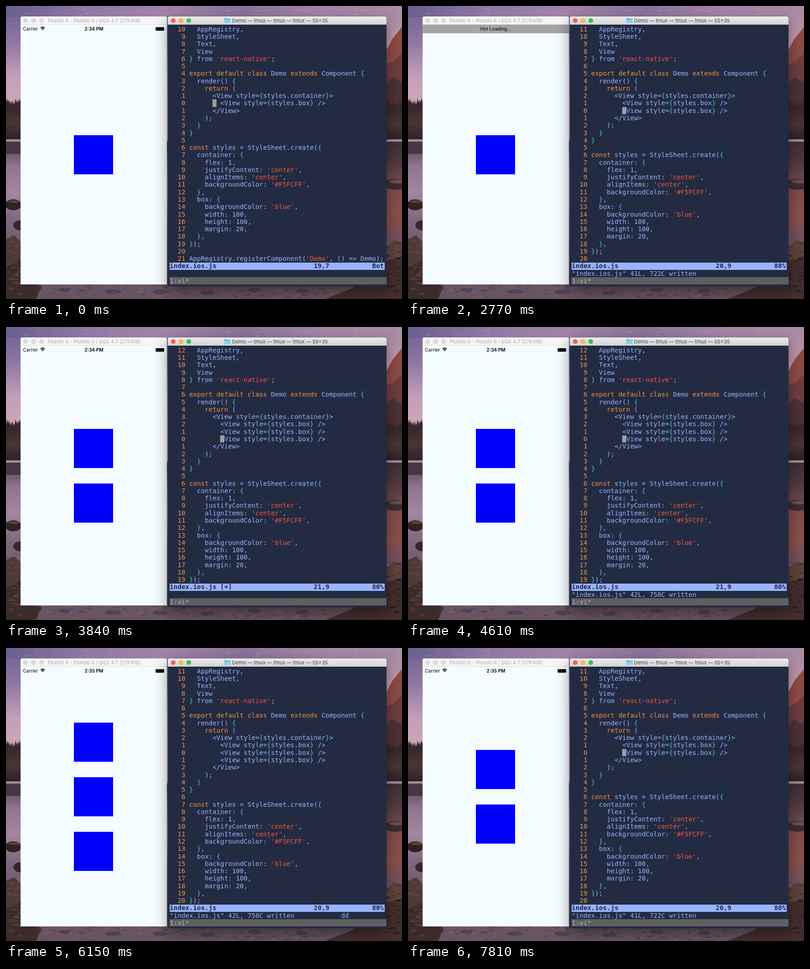
An HTML page with a canvas for the animation above (8 s loop, 869 by 644 pixels).

```html
<!DOCTYPE html>
<html lang="en">
<head>
<meta charset="utf-8">
<title>Hot loading demo</title>
<style>
  html, body { margin: 0; width: 100%; height: 100%; overflow: hidden; background: #5d4a58; }
  #stage { position: relative; width: 869px; height: 644px; overflow: hidden; }
  #stage div, #stage canvas, #stage svg { position: absolute; }
  .ui { font-family: Inter, Roboto, sans-serif; white-space: pre; line-height: 16px; text-align: center; }
  .dot { width: 10.4px; height: 10.4px; top: 3.7px; border-radius: 50%; box-sizing: border-box; box-shadow: inset 0 0 0 .6px rgba(0,0,0,.12); }

  #phone { left: 32px; top: 23px; width: 321px; height: 589px; background: #f5fcff; border-radius: 4px 4px 0 0; overflow: hidden; }
  #phone .bar { width: 321px; height: 18px; background: #f6f6f6; box-shadow: inset 0 -1px #dedede; }
  #phone .dot { background: #dcdcdc; }
  #phone .title { width: 321px; top: 1px; left: 1px; font-size: 11px; color: #acacac; }
  #screen { left: 0; top: 18px; width: 321px; height: 571px; overflow: hidden; }
  #carrier { left: 5px; top: 1px; font-size: 10.2px; }
  #clock { left: 0; width: 322px; top: 1px; font-size: 10.2px; font-weight: 600; }
  #wifi { left: 43px; top: 4px; }
  #battery { left: 296px; top: 5px; }
  #hot { left: 0; width: 321px; height: 19px; background: #a4a4a4; font-size: 10.3px; line-height: 18px; }
  .box { left: 117px; width: 86px; height: 86px; background: #00f; }

  #term { left: 355px; top: 23px; width: 480px; height: 593px; background: #232b43; border-radius: 4px;
    box-shadow: 0 11px 30px rgba(0,0,0,.42), 0 0 1px rgba(0,0,0,.5); }
  #term .bar { width: 480px; height: 18px; border-radius: 4px 4px 0 0; background: linear-gradient(#ebebeb, #d2d2d2); }
  #term .title { left: 141px; top: 1px; font-size: 11px; color: #444; }
  #folder { left: 124px; top: 3px; }
  #text { left: 0; top: 0; width: 869px; height: 644px; font: 14.2px "DejaVu Sans Mono", monospace; color: #96b3fa; }
  .row { white-space: pre; left: 359.3px; height: 16.27px; line-height: 16.27px; }
  #ruler { left: 359px; top: 564px; width: 472px; height: 16px; background: #98b4ff; }
  #tmux { left: 359px; top: 596px; width: 476px; height: 16px; background: #5f5f5f; }
  #cursor { width: 8.6px; height: 16.3px; background: #999; }
  .k { color: #ee943c; }
  .s { color: #ef5638; }
  .b { color: #3fc8c0; }
  .inv { color: #1f2740; font-weight: bold; }
  .dim { color: #b4b4b4; }
</style>
</head>
<body>
<div id="stage">
  <canvas id="scene" width="869" height="644"></canvas>

  <div id="phone">
    <div class="bar">
      <div class="dot" style="left:5.8px"></div><div class="dot" style="left:23.3px"></div><div class="dot" style="left:40.8px"></div>
      <div class="ui title">Plundo 6 - Plundo 6 / pQS 4.7 (27K418)</div>
    </div>
    <div id="screen">
      <div id="carrier" class="ui">Carrier</div>
      <svg id="wifi" width="11" height="9" viewBox="0 0 11 9" fill="none" stroke="#000" stroke-width="1.5">
        <path d="M.6 3.2Q5.5-1 10.4 3.2M2.4 5.2Q5.5 2.6 8.6 5.2"/><path d="M3.7 6.5Q5.5 5 7.3 6.5L5.5 8.6z" fill="#000" stroke="none"/>
      </svg>
      <div id="clock" class="ui"></div>
      <svg id="battery" width="22" height="9">
        <rect x=".4" y=".4" width="18.4" height="7.8" rx="1.2"/><path d="M19.6 2.8q1.5 1.4 0 2.9z"/>
      </svg>
      <div id="boxes"></div>
      <div id="hot" class="ui">Hot Loading...</div>
    </div>
  </div>

  <div id="term">
    <div class="bar">
      <div class="dot" style="left:6.8px;background:#fc5b57"></div><div class="dot" style="left:23.8px;background:#fdbb3f"></div><div class="dot" style="left:40.8px;background:#30c748"></div>
      <svg id="folder" width="14" height="12">
        <path d="M0 1.5Q0 .5 1 .5H5L6.5 2H13Q14 2 14 3V10Q14 11 13 11H1Q0 11 0 10z" fill="#5fb9e8"/><path d="M0 4H14V10Q14 11 13 11H1Q0 11 0 10z" fill="#82d2f6"/>
      </svg>
      <div class="ui title">Demo — tmux — tmux — tmux — 55×35</div>
    </div>
  </div>
  <div id="text">
    <div id="ruler"></div>
    <div id="tmux"></div>
    <div id="cursor"></div>
    <div id="rows"></div>
  </div>
</div>

<script>
const $ = id => document.getElementById(id);
const LOOP = 8000, COL = 8.55, ROW = 16.27, LEFT = 359.3, TOP = 42.75;
const STATUS = 32, CMD = 33, TMUX = 34;

const head = `  AppRegistry,
  StyleSheet,
  Text,
  View
} from 'react-native';

export default class Demo extends Component {
  render() {
    return (
      <View style={styles.container}>`.split('\n');
const view = '        <View style={styles.box} />';
const tail = `      </View>
    );
  }
}

const styles = StyleSheet.create({
  container: {
    flex: 1,
    justifyContent: 'center',
    alignItems: 'center',
    backgroundColor: '#F5FCFF',
  },
  box: {
    backgroundColor: 'blue',
    width: 100,
    height: 100,
    margin: 20,
  },
});

AppRegistry.registerComponent('Demo', () => Demo);`.split('\n');

// Each step lists only what changes; cur is [row, column] on the terminal grid.
const written = '"index.ios.js" 41L, 722C written';
const written3 = '"index.ios.js" 42L, 758C written';
const steps = [
  [0, { views: 1, line: 10, cur: [10, 11], pos: '19,7', pct: 'Bot', mod: false, cmd: '', keys: '', boxes: 1, hot: null, time: '2:34' }],
  [1080, { views: 2, line: 11, cur: [11, 13], pos: '20,9', pct: '88%', mod: true }],
  [1760, { cmd: ':', cur: [CMD, 1] }],
  [2150, { cmd: ':w', cur: [CMD, 2] }],
  [2320, { cmd: '"index.ios.js"', cur: [CMD, 14] }],
  [2410, { cmd: written, cur: [11, 13], mod: false }],
  [2770, { hot: 0 }],
  [3400, { hot: -2, boxes: 2 }],
  [3490, { hot: -11 }],
  [3570, { hot: null }],
  [3750, { views: 3, line: 12, cur: [12, 13] }],
  [3840, { cmd: '', pos: '21,9', pct: '80%', mod: true }],
  [4140, { cmd: ':', cur: [CMD, 1] }],
  [4250, { cmd: ':w', cur: [CMD, 2] }],
  [4610, { cmd: written3, cur: [12, 13], mod: false }],
  [4700, { hot: 0 }],
  [4870, { time: '2:35' }],
  [5140, { boxes: 3 }],
  [5320, { hot: -10 }],
  [5410, { hot: null }],
  [5760, { line: 11, cur: [11, 13], pos: '20,9' }],
  [6030, { keys: 'd', cur: null }],
  [6150, { keys: 'dd' }],
  [6240, { keys: '', cmd: '', views: 2, cur: [11, 13], pct: '88%', mod: true }],
  [6350, { cmd: ':', cur: [CMD, 1] }],
  [6560, { cmd: ':w', cur: [CMD, 2] }],
  [7010, { cmd: written, cur: [11, 13], mod: false }],
  [7100, { hot: 0 }],
  [7450, { boxes: 2 }],
  [7720, { hot: -10 }],
  [7810, { hot: null }]
];
let last = {};
const states = steps.map(([at, change]) => (last = { ...last, ...change, at }));

const escape = s => s.replace(/</g, '&lt;').replace(/>/g, '&gt;');
const span = (cls, s) => `<span class="${cls}">${s}</span>`;
const token = /'[^']*'|\b(?:export|default|class|extends|return|const)\b|[{}]/g;
const paint = s => escape(s).replace(token, t => span(t[0] === "'" ? 's' : /[{}]/.test(t) ? 'b' : 'k', t));
const row = (r, html, cls = '') => `<div class="row ${cls}" style="top:${TOP + r * ROW}px">${html}</div>`;

function render(s) {
  const lines = [...head, ...Array(s.views).fill(view), ...tail].slice(0, STATUS);
  const code = lines.map((text, r) =>
    row(r, span('k', String(Math.abs(r - s.line)).padStart(4)) + ' ' + paint(text)));
  const name = 'index.ios.js' + (s.mod ? ' [+]' : '');
  $('rows').innerHTML = code.join('') +
    row(STATUS, name.padEnd(37) + s.pos.padEnd(15) + s.pct, 'inv') +
    row(CMD, s.cmd.padEnd(44) + s.keys) +
    row(TMUX, '1:vi*', 'dim');

  const cursor = $('cursor').style;
  cursor.display = s.cur ? '' : 'none';
  if (s.cur) {
    cursor.top = TOP + s.cur[0] * ROW + 'px';
    cursor.left = LEFT + s.cur[1] * COL + 'px';
  }

  $('clock').textContent = s.time + ' PM';
  $('hot').style.display = s.hot === null ? 'none' : '';
  $('hot').style.top = (s.hot || 0) + 'px';
  $('boxes').innerHTML = Array.from({ length: s.boxes }, (_, i) =>
    `<div class="box" style="top:${243 - 60 * (s.boxes - 1) + 120 * i}px"></div>`).join('');
}

function drawScene() {
  const g = $('scene').getContext('2d');
  let seed = 7;
  const rnd = () => (seed = seed * 16807 % 2147483647) / 2147483647;
  const fade = (x0, y0, x1, y1, ...colors) => {
    const f = g.createLinearGradient(x0, y0, x1, y1);
    colors.forEach((c, i) => f.addColorStop(i / (colors.length - 1), c));
    return f;
  };
  const rect = (x, y, w, h, fill) => { g.fillStyle = fill; g.fillRect(x, y, w, h); };
  const poly = (fill, ...p) => {
    g.fillStyle = fill;
    g.beginPath();
    for (let i = 0; i < p.length; i += 2) g.lineTo(p[i], p[i + 1]);
    g.fill();
  };
  const rock = (x, y, rx, ry, fill) => {
    g.fillStyle = fill;
    g.beginPath();
    g.ellipse(x, y, rx, ry, 0, 0, 7);
    g.fill();
  };
  const trees = (x0, x1, y) => {
    for (let x = x0; x < x1; x += 3) {
      const h = y + rnd() * 10;
      poly('#37282c', x - 5, h + 26, x, h, x + 5, h + 26);
    }
    rect(x0, y + 20, x1 - x0, 74 - y % 10, fade(0, y + 20, 0, 294, '#37282c', '#4a3535', '#2c2126'));
  };
  const speckle = (n, x, y, w, h, fill) => {
    for (let i = 0; i < n; i++) rock(x + rnd() * w, y + rnd() * h, 2 + rnd() * 6, 1 + rnd() * 2, fill);
  };

  // Sky
  rect(0, 0, 869, 300, fade(0, 0, 0, 230, '#6f6292', '#8d76a2', '#c29fb7', '#d0a9b8'));
  rect(0, 0, 869, 24, fade(0, 0, 869, 0, '#685f90', '#8f78a3', '#a183a9', '#8a739c', '#a486a8', '#a98ba6'));
  rect(834, 20, 35, 120, fade(0, 20, 0, 110, '#a98ba6', '#cfa0ab'));
  speckle(60, 0, 0, 869, 22, 'rgba(200,155,185,.2)');

  // Mountain and shore
  poly('#8e4b45', 834, 98, 848, 72, 869, 46, 869, 300, 834, 300);
  poly('#6e3d3f', 834, 128, 850, 122, 869, 104, 869, 300, 834, 300);
  poly('#4b3238', 834, 170, 848, 156, 869, 168, 869, 300, 834, 300);
  trees(0, 36, 202);
  trees(832, 872, 204);

  // Lake
  rect(0, 294, 869, 350, fade(0, 294, 0, 644, '#4a3b48', '#8f7590', '#a4869f', '#80677f', '#705a6c', '#6b5663', '#685360'));
  rect(0, 293, 869, 5, '#a08b9c');
  rect(0, 299, 34, 26, '#453742');
  rect(834, 299, 35, 85, fade(0, 299, 0, 384, '#3d2f38', '#50383f', '#6d4a4e'));
  rect(834, 400, 35, 120, fade(0, 400, 0, 520, '#7d4b49', '#8a5049', '#6f5060'));

  // Rocks on both banks
  rock(16, 437, 18, 12, '#2f2324');
  rock(18, 430, 13, 3, '#57433f');
  rock(32, 482, 16, 11, '#35272a');
  poly('#4f3a36', 0, 512, 18, 504, 36, 522, 36, 644, 0, 644);
  poly('#3b2b2a', 0, 574, 36, 556, 78, 616, 66, 644, 0, 644);
  rock(854, 392, 24, 12, '#3d2d30');
  rock(858, 386, 17, 4, '#68504f');
  poly('#5d443d', 834, 530, 852, 514, 869, 520, 869, 600, 834, 590);
  poly('#432f2d', 700, 644, 760, 620, 834, 560, 869, 552, 869, 644);
  speckle(26, 0, 515, 34, 120, 'rgba(110,84,74,.4)');
  speckle(26, 834, 520, 35, 110, 'rgba(28,20,22,.4)');

  // Pebbles under the shallow water
  for (let x = 130; x < 700; x += 104) rock(x, 622 + rnd() * 10, 11 + rnd() * 7, 5, '#4b4557');
  speckle(90, 70, 612, 640, 32, 'rgba(70,54,62,.35)');
  speckle(50, 70, 612, 640, 32, 'rgba(140,112,122,.22)');
}

let shown = null;
function tick() {
  const t = performance.now() % LOOP;
  const state = states.findLast(s => s.at <= t);
  if (state !== shown) render(shown = state);
  requestAnimationFrame(tick);
}

drawScene();
tick();
</script>
</body>
</html>
```
